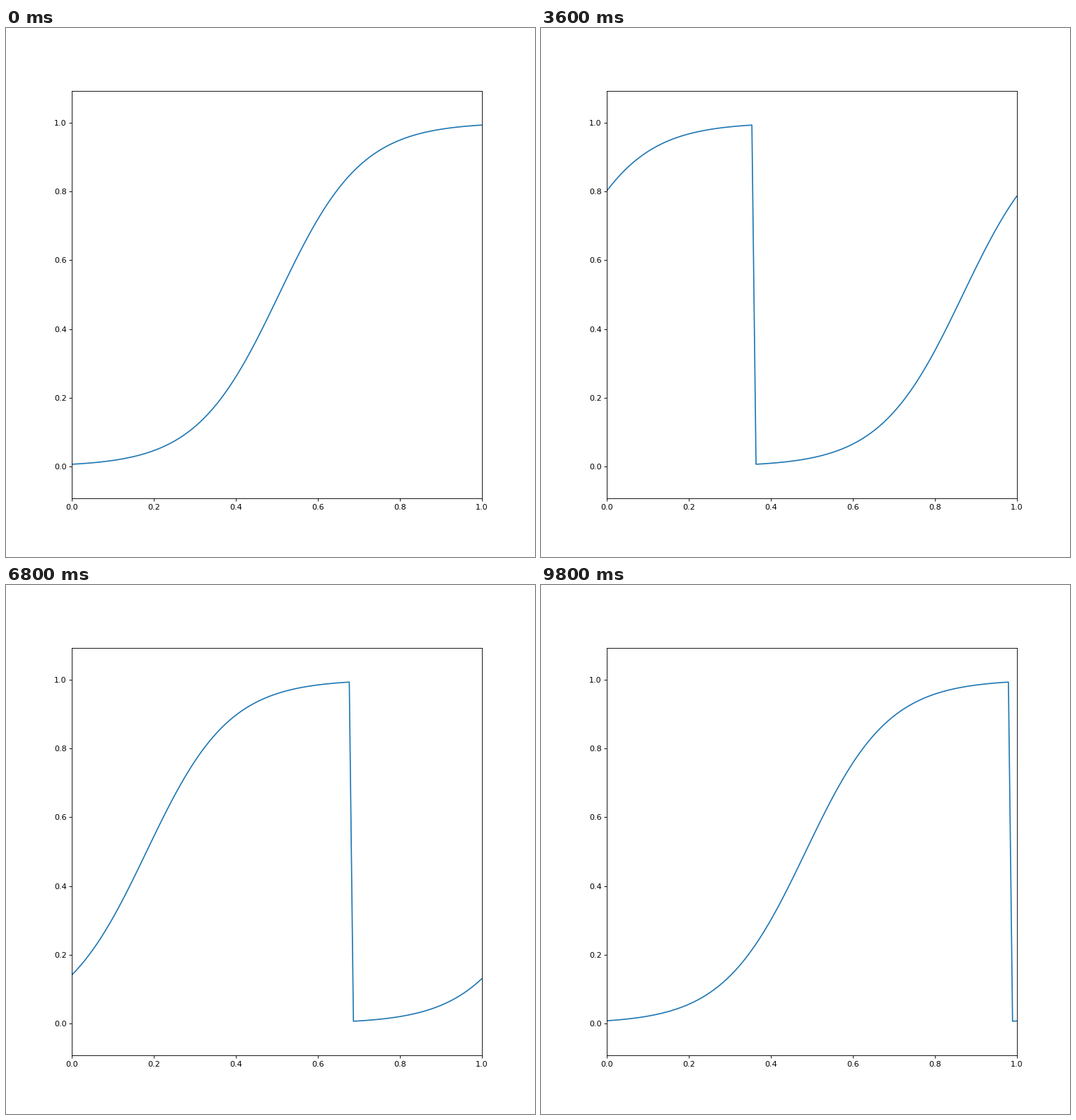
These frames come from a looping animation (748x748 px, 10000 ms). A matplotlib script:

```python
import numpy as np
import matplotlib.pyplot as plt
from matplotlib.animation import FuncAnimation

SIZE = 748
DPI = 80
PLOT = 747.36     # extent of the plot layout in pixels, anchored top left
SAMPLES = 100
STEP = 2          # samples shifted per frame
FRAMES = SAMPLES // STEP
INTERVAL = 200

plt.rcParams["font.family"] = "DejaVu Sans"

x = np.linspace(0, 1, SAMPLES)
y = 1 / (1 + np.exp(-np.arange(-5, 5, 10 / SAMPLES)[:SAMPLES]))

fig, ax = plt.subplots(figsize=(SIZE / DPI, SIZE / DPI), dpi=DPI)
fig.subplots_adjust(left=0.125 * PLOT / SIZE, right=0.9 * PLOT / SIZE,
                    bottom=(0.11 * PLOT + 1) / SIZE,
                    top=(0.88 * PLOT + 1) / SIZE)
line, = ax.plot(x, y, color="#1f77b4", lw=1.5)

margin = 0.1 * np.ptp(y)
ax.set_xlim(0, 1)
ax.set_ylim(y.min() - margin, y.max() + margin)
ticks = np.linspace(0, 1, 6)
ax.set_xticks(ticks)
ax.set_yticks(ticks)


def update(frame):
    """Shift the sigmoid to the right, wrapping around the edge."""
    line.set_ydata(np.roll(y, STEP * frame))
    return line,


anim = FuncAnimation(fig, update, frames=FRAMES, interval=INTERVAL,
                     init_func=lambda: update(0), repeat=True, repeat_delay=0)

plt.show()
```
